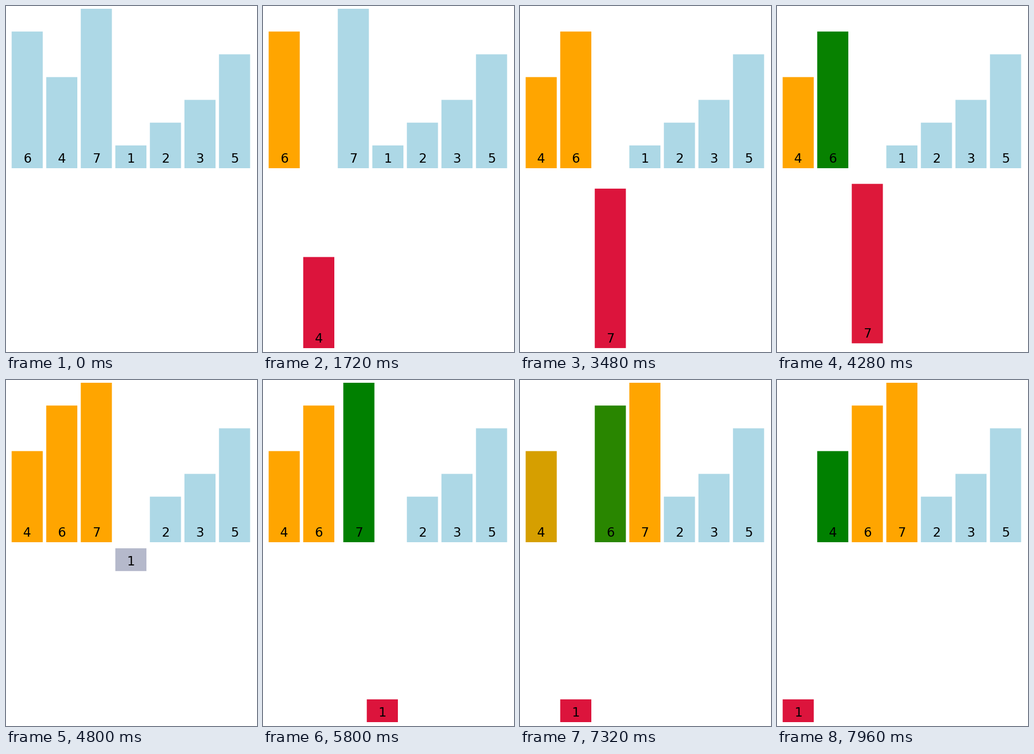
These frames come from a looping animation (454 px wide and 625 px high, 8000 ms). A matplotlib script:

```python
import numpy as np
import matplotlib.pyplot as plt
from matplotlib.animation import FuncAnimation
from matplotlib.colors import to_rgb
from matplotlib.patches import Rectangle

W, H, DPI = 454, 625, 100
FRAMES, INTERVAL = 200, 40
VALUES = [6, 4, 7, 1, 2, 3, 5]
LEFT, PITCH, BAR_W = 10.25, 62.5, 56.25
BASE, UNIT, DROP = 293, 288 / 7, 325
EASE_MS, LEAD_MS = 260, 9
STARTS = [18, 31, 43, 55, 68, 81, 93, 106, 118, 130, 143, 155, 168, 181, 193]

IDLE, SORTED, KEY, COMPARED = (
    np.array(to_rgb(c)) for c in ("lightblue", "orange", "crimson", "green"))


def pose(col, row, color):
    return np.array([col, row, *color])


def insertion_sort(values):
    """Yield the bars' poses (column, row, r, g, b) after every step."""
    order = list(range(len(values)))
    poses = np.array([pose(i, 0, IDLE) for i in order])
    yield poses.copy()
    poses[0, 2:] = SORTED
    yield poses.copy()
    for i in range(1, len(values)):
        key = order[i]
        poses[key] = pose(i, 1, KEY)
        yield poses.copy()
        last = None
        for j in range(i - 1, -1, -1):
            other = order[j]
            if last is not None:
                poses[last, 2:] = SORTED
            poses[other, 2:] = COMPARED
            last = other
            yield poses.copy()
            if values[other] < values[key]:
                break
            order[j], order[j + 1] = key, other
            poses[key, 0], poses[other, 0] = j, j + 1
            yield poses.copy()
        poses[key, 1:] = [0, *SORTED]
        poses[last, 2:] = SORTED
        yield poses.copy()


def cubic_in_out(t):
    t = min(max(t, 0), 1)
    return 4 * t ** 3 if t < 0.5 else 1 - 4 * (1 - t) ** 3


STEPS = list(insertion_sort(VALUES))

fig = plt.figure(figsize=(W / DPI, H / DPI), dpi=DPI, facecolor="white")
ax = fig.add_axes([0, 0, 1, 1])
ax.set(xlim=(0, W), ylim=(H, 0))
ax.axis("off")

bars = [ax.add_patch(Rectangle((0, 0), BAR_W, v * UNIT, lw=0, snap=False))
        for v in VALUES]
labels = [ax.text(0, 0, str(v), family="DejaVu Sans", size=23 * 72 / DPI,
                  ha="center", va="baseline", color="black")
          for v in VALUES]


def draw(frame):
    k = sum(s <= frame for s in STARTS)
    poses = STEPS[k]
    if k:
        ms = (frame - STARTS[k - 1]) * INTERVAL + LEAD_MS
        p = cubic_in_out(ms / EASE_MS)
        poses = STEPS[k - 1] * (1 - p) + poses * p
    for bar, label, (col, row, *rgb) in zip(bars, labels, poses):
        x, y = LEFT + col * PITCH, BASE + row * DROP
        bar.set_xy((x, y - bar.get_height()))
        bar.set_facecolor(np.clip(rgb, 0, 1))
        label.set_position((x + BAR_W / 2, y - 10))
    return bars + labels


anim = FuncAnimation(fig, draw, frames=FRAMES, interval=INTERVAL,
                     repeat=True, repeat_delay=0, blit=False)
plt.show()
```
